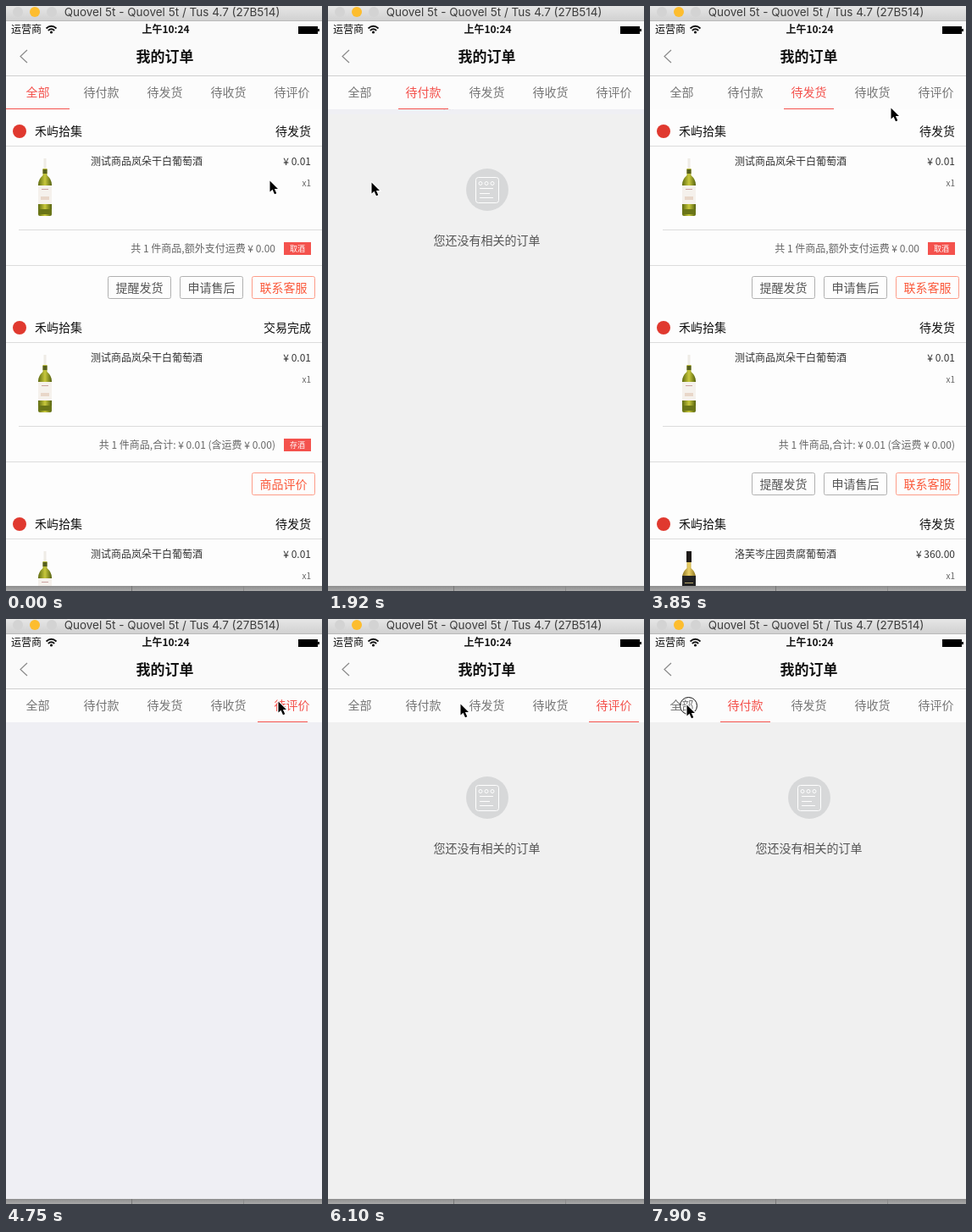
An HTML page with a canvas for the animation above (8000 ms loop, 373 px wide and 691 px high).

```html
<!DOCTYPE html>
<html lang="zh-CN">
<head>
<meta charset="utf-8">
<title>我的订单</title>
<style>
html, body { margin: 0; width: 100%; height: 100%; overflow: hidden; background: #fafafa; }
canvas { display: block; }
</style>
</head>
<body>
<canvas id="stage" width="373" height="691"></canvas>
<script>
const ctx = document.getElementById('stage').getContext('2d');
const W = 373, TOP = 122, BOTTOM = 685, LOOP = 8000, PULL = 54, CARD = 232;
const CJK = '"Noto Sans CJK SC", "Noto Sans CJK", sans-serif';
const RED = '#f4524d', ORANGE = '#fb5a3c', BLANK = '#efeff4';
const TABS = ['全部', '待付款', '待发货', '待收货', '待评价'];
const SHOP = '禾屿拾集';

const WHITE_WINE = { name: '测试商品岚朵干白葡萄酒', price: '¥ 0.01' };
const SWEET_WINE = { name: '洛芙岑庄园贵腐葡萄酒', price: '¥ 360.00', dark: true };
const SERVICE = ['提醒发货', '申请售后', '联系客服'];
const FREIGHT = '共 1 件商品,额外支付运费 ¥ 0.00';
const TOTAL = '共 1 件商品,合计: ¥ 0.01 (含运费 ¥ 0.00)';
const pickUp = { wine: WHITE_WINE, state: '待发货', sum: FREIGHT, badge: '取酒', buttons: SERVICE };
const finished = { wine: WHITE_WINE, state: '交易完成', sum: TOTAL, badge: '存酒', buttons: ['商品评价'] };
const waiting = { wine: WHITE_WINE, state: '待发货', sum: TOTAL, buttons: SERVICE };
const ORDERS = {
  0: [pickUp, finished, pickUp],
  2: [pickUp, waiting, { ...waiting, wine: SWEET_WINE }]
};

// A swipe drags the pages along; a tap on a tab scrolls to its page.
const swipe = (page, start, end, refresh, loaded) =>
  ({ page, press: start, release: end - 50, start, end, mark: end - 35, refresh, loaded });
const tap = (page, press, refresh = Infinity, loaded = Infinity) =>
  ({ page, press, release: press + 150, start: press + 150, end: press + 600, mark: press + 150, refresh, loaded });
const MOVES = [
  swipe(1, 600, 1175, 1120, 1680),
  swipe(2, 2960, 3105, 3107, 3500),
  tap(4, 4300, 4950, 5340),
  tap(1, 6390),
  tap(0, 7890)
];

// Pointer stops: time, x, y
const POINTER = [[600, 311, 206], [1175, 198, 203], [1900, 46, 208], [2810, 290, 207], [2960, 290, 207],
  [3105, 177, 208], [3850, 284, 120], [4150, 321, 97], [5350, 321, 97], [6250, 123, 101], [7600, 123, 101], [7900, 43, 101]];

const clamp = p => Math.min(1, Math.max(0, p));
const lerp = (a, b, p) => a + (b - a) * p;

function ease(t, start, length) {
  const p = clamp((t - start) / length);
  return p * p * (3 - 2 * p);
}

function spring(elapsed) {
  const x = Math.max(0, elapsed) * .0066;
  return 1 - Math.exp(-x) * (Math.cos(x) + Math.sin(x));
}

function sampleTime(t) {
  if (t < 600) return 0;
  return t < 3850 ? 3850 - Math.ceil((3850 - t) / 148.5) * 148.5
                  : 3850 + Math.floor((t - 3850) / 150) * 150;
}

function stateAt(t) {
  const state = { position: 0, lineX: 0, lineWidth: 75, pull: 0, selected: 0, loaded: new Set([0]) };
  for (const move of MOVES) {
    const settle = spring(t - move.mark);
    state.position = lerp(state.position, move.page, ease(t, move.start, move.end - move.start));
    state.lineX = lerp(state.lineX, 8 + 75 * move.page, settle);
    state.lineWidth = lerp(state.lineWidth, 59, settle);
    state.pull += PULL * (ease(t, move.refresh, 300) - ease(t, move.loaded, 300));
    if (t >= move.mark) state.selected = move.page;
    if (t >= move.loaded) state.loaded.add(move.page);
  }
  return state;
}

function rect(x, y, w, h, fill) {
  ctx.fillStyle = fill;
  ctx.fillRect(x, y, w, h);
}

function text(str, x, y, size, color, align = 'left', weight = 400, font = CJK) {
  ctx.font = `${weight} ${size}px ${font}`;
  ctx.fillStyle = color;
  ctx.textAlign = align;
  ctx.fillText(str, x, Math.round(y + size * .37));
}

function disc(x, y, r, fill) {
  ctx.beginPath();
  ctx.arc(x, y, r, 0, 7);
  ctx.fillStyle = fill;
  ctx.fill();
}

function ring(x, y, r, color) {
  ctx.beginPath();
  ctx.arc(x, y, r, 0, 7);
  ctx.strokeStyle = color;
  ctx.lineWidth = 1;
  ctx.stroke();
}

function outline(path, color, width = 1) {
  ctx.strokeStyle = color;
  ctx.lineWidth = width;
  ctx.stroke(new Path2D(path));
}

function box(x, y, w, h, r, color) {
  ctx.beginPath();
  ctx.roundRect(x + .5, y + .5, w - 1, h - 1, r);
  ctx.strokeStyle = color;
  ctx.lineWidth = 1;
  ctx.stroke();
}

function gradient(x0, y0, x1, y1, ...colors) {
  const g = ctx.createLinearGradient(x0, y0, x1, y1);
  colors.forEach((c, i) => g.addColorStop(i / (colors.length - 1), c));
  return g;
}

function bottle(x, y, dark) {
  ctx.save();
  ctx.translate(x, y);
  ctx.fillStyle = dark ? gradient(0, 0, 16, 0, '#8b7420', '#ecd067', '#8b7420')
                       : gradient(0, 0, 16, 0, '#5e6b10', '#c8c83c', '#55620e');
  ctx.fill(new Path2D('M5.5 12H10.5V20Q16 25 16 31V66Q16 68 14 68H2Q0 68 0 66V31Q0 25 5.5 20Z'));
  if (dark) {
    rect(5, 0, 6, 13, '#1d1a18');
    rect(0, 29, 16, 31, '#222');
    rect(3, 37, 10, 1, '#b5a56a');
  } else {
    rect(6.5, 0, 3, 12, '#efece6');
    rect(5.5, 13, 5, 5, '#565f1c');
    rect(0, 32, 16, 22, '#f5f1ec');
    rect(4, 36, 8, 1, '#c9a2a0');
    rect(3, 45, 10, 4, '#e8d6c8');
    rect(0, 60, 16, 6, '#6a7518');
  }
  ctx.restore();
}

function orderCard(order, y) {
  const { wine } = order;
  disc(16, y + 26, 8, '#e0392f');
  text(SHOP, 34, y + 26, 14, '#111');
  text(order.state, 360, y + 26, 14, '#111', 'right');
  rect(0, y + 43, W, 1, '#dcdcdc');
  bottle(38, y + 58, wine.dark);
  text(wine.name, 100, y + 62, 12, '#333');
  text(wine.price, 360, y + 62, 12, '#333', 'right');
  text('x1', 360, y + 87, 10, '#666', 'right');
  rect(15, y + 142, W, 1, '#dcdcdc');
  text(order.sum, order.badge ? 318 : 360, y + 165, 12, '#666', 'right');
  if (order.badge) {
    rect(328, y + 157, 32, 15, RED);
    text(order.badge, 344, y + 164.5, 9, '#fff', 'center');
  }
  rect(0, y + 184, W, 1, '#dcdcdc');
  order.buttons.forEach((label, i) => {
    const x = 290 - 85 * (order.buttons.length - 1 - i), hot = x === 290;
    box(x, y + 197, 75, 27, 2, hot ? '#fd9c88' : '#b0b0b0');
    text(label, x + 37.5, y + 210.5, 14, hot ? ORANGE : '#555', 'center');
  });
}

function emptyState(y) {
  disc(188, y + 89, 25, '#d7d8d9');
  box(174, y + 74, 28, 31, 3, '#fff');
  for (let i = 0; i < 3; i++) {
    ring(180 + 7 * i, y + 81.5, 2, '#fff');
    rect(179, Math.round(y + 87 + 5.5 * i), i === 1 ? 12 : 16, 1, '#fff');
  }
  text('您还没有相关的订单', 187.5, y + 149, 14, '#555', 'center');
}

function refreshHeader(bottom, t) {
  text('正在刷新数据中...', 187.5, bottom - 40.5, 14, '#5a5a5a', 'center', 700);
  text('最后更新：今天 10:24', 187.5, bottom - 13.5, 14, '#5a5a5a', 'center', 700);
  for (let i = 0; i < 12; i++) {
    ctx.save();
    ctx.translate(87, bottom - 27);
    ctx.rotate((i + Math.floor(t / 83)) * Math.PI / 6);
    rect(-1, -10, 2, 5, `rgba(110,110,115,${.2 + i / 16})`);
    ctx.restore();
  }
}

function drawPage(index, pull, ready, t) {
  const y = TOP + Math.round(pull), orders = ORDERS[index];
  rect(0, TOP, W, BOTTOM - TOP, BLANK);
  refreshHeader(y, t);
  if (!ready) return;
  rect(0, y, W, BOTTOM - y, orders ? '#fdfdfd' : '#f0f0f0');
  if (orders) orders.forEach((order, i) => orderCard(order, y + i * CARD));
  else emptyState(y);
}

function drawPages(state, t) {
  ctx.save();
  ctx.beginPath();
  ctx.rect(0, TOP, W, BOTTOM - TOP);
  ctx.clip();
  TABS.forEach((_, i) => {
    const x = Math.round((i - state.position) * W);
    if (Math.abs(x) >= W) return;
    ctx.save();
    ctx.translate(x, 0);
    drawPage(i, i === state.selected ? state.pull : 0, state.loaded.has(i), t);
    ctx.restore();
  });
  ctx.restore();
}

function drawWindow() {
  rect(0, 0, W, 18, gradient(0, 0, 0, 18, '#e6e6e6', '#d0d0d0'));
  rect(0, 17, W, 1, '#b9b9b9');
  disc(14, 7, 6, '#d3d3d3');
  disc(34, 7, 6, '#fdbd2e');
  disc(54, 7, 6, '#d3d3d3');
  text('Quovel 5t - Quovel 5t / Tus 4.7 (27B514)', 196, 7.5, 13.5, '#3c3c3c', 'center', 400, 'Inter, sans-serif');
  rect(0, BOTTOM, W, 6, gradient(0, BOTTOM, 0, 691, '#8e8e8e', '#a9a9a9'));
  rect(148, BOTTOM, 1, 6, '#777');
  rect(280, BOTTOM, 1, 6, '#8b8b8b');
}

function drawBars(state) {
  rect(0, 18, W, 64, '#fafafa');
  text('运营商', 6, 28, 12, '#111');
  outline('M47.5 26.5Q53.5 21 59.5 26.5M49.8 29Q53.5 25.5 57.2 29', '#111', 1.8);
  disc(53.5, 31, 1.6, '#111');
  text('上午10:24', 188.5, 28, 12, '#111', 'center', 700);
  rect(345, 24, 23, 9, '#000');
  rect(368, 27, 2, 3, '#111');
  outline('M25 52L17 59.5L25 67', '#8a8a8a', 1.2);
  text('我的订单', 187.5, 60, 17, '#111', 'center', 700);
  rect(0, 82, W, 1, '#cfcfcf');

  rect(0, 83, W, 39, '#fcfcfc');
  TABS.forEach((label, i) =>
    text(label, 37.5 + 75 * i, 102, 14, i === state.selected ? RED : '#777', 'center'));
  rect(Math.round(state.lineX), 121, Math.round(state.lineWidth), 1, RED);
}

function pointerAt(t) {
  const next = POINTER.findIndex(stop => stop[0] > t);
  if (next < 1) return POINTER.at(next).slice(1);
  const [t0, x0, y0] = POINTER[next - 1], [t1, x1, y1] = POINTER[next];
  const p = (t - t0) / (t1 - t0);
  return [lerp(x0, x1, p), lerp(y0, y1, p)];
}

function drawPointer(t) {
  const [x, y] = pointerAt(t).map(Math.round);
  const arrow = 'M.5 .5V13.5L3.5 10.8L6 16.2L8.3 15.2L5.9 10H10Z';
  ctx.save();
  ctx.translate(x, y);
  if (MOVES.some(move => t > move.press && t < move.release)) ring(2.5, 1.5, 10, '#111');
  outline(arrow, '#fff', 2);
  ctx.fillStyle = '#000';
  ctx.fill(new Path2D(arrow));
  ctx.restore();
}

function frame(now) {
  const t = sampleTime(now % LOOP), state = stateAt(t);
  drawPages(state, t);
  drawWindow();
  drawBars(state);
  drawPointer(t);
  requestAnimationFrame(frame);
}
requestAnimationFrame(frame);
</script>
</body>
</html>
```
